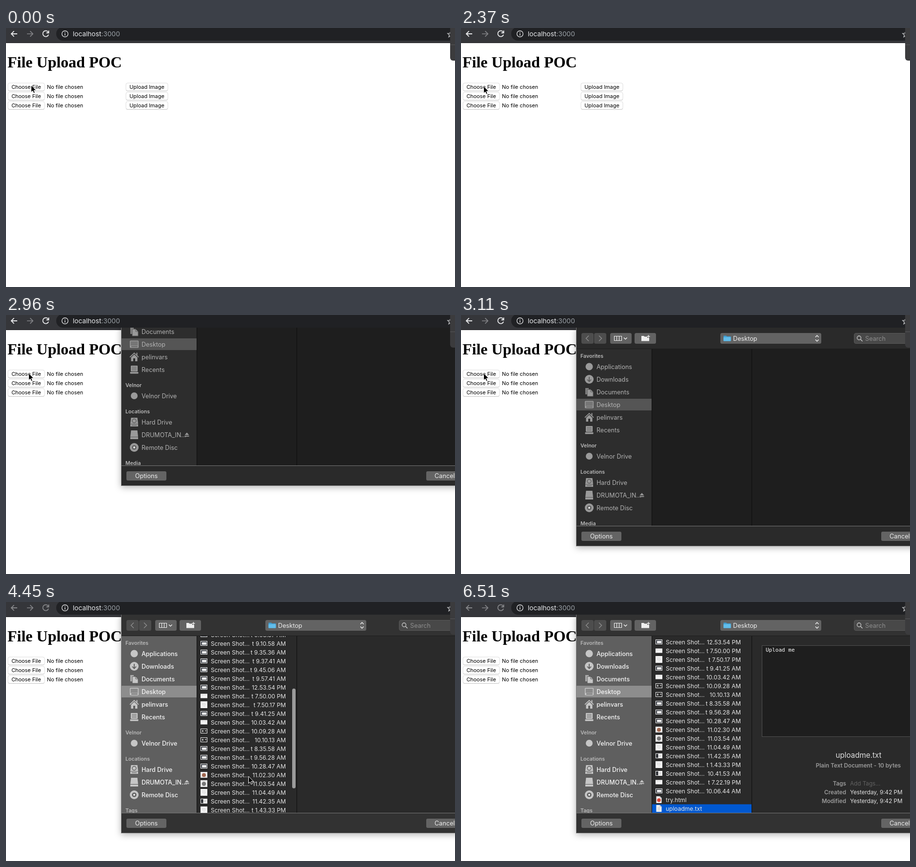
An HTML page for the animation above (8 s loop, 921 by 532 pixels).

```html
<!DOCTYPE html>
<html lang="en">
<head>
<meta charset="utf-8">
<title>File Upload POC</title>
<style>
html, body { margin: 0; width: 100%; height: 100%; overflow: hidden; background: #fff; }
svg { display: block; width: 921px; height: 532px; font-family: Inter, "Open Sans", sans-serif; }
text { white-space: pre; }
.h1 { font: bold 32px "Liberation Serif", serif; }
.form { font-size: 10.9px; }
.url { font-size: 13.7px; }
.head { font-size: 10.6px; font-weight: 600; fill: #b9b9b9; }
.item { font-size: 12.5px; font-weight: 500; fill: #f4f4f4; }
.ui { font-size: 12.7px; fill: #ededed; }
.row { font-size: 12px; fill: #e6e6e6; }
.info { font-size: 11.7px; }
.label { font-weight: 600; fill: #9b9b9b; }
.mono { font: 11px "DejaVu Sans Mono", monospace; fill: #fff; }
.icons { fill: #c6c6c6; stroke: none; }
.side { fill: #5f5f5f; }
.chosen { fill: #8d8d8d; }
.chrome { fill: #323232; }
.list { fill: #2a2a2a; }
.dim .side { fill: #2d2d2d; }
.dim .chosen { fill: #555; }
.dim .chrome { fill: #2a2a2a; }
.dim .list { fill: #1e1e1e; }
.dim .item { fill: #b2b2b2; font-weight: 400; }
.dim .icons { fill: #9a9a9a; }
</style>
</head>
<body>
<svg id="stage" viewBox="0 0 921 532"></svg>
<script>
const LOOP = 8000;
const stage = document.getElementById('stage');

const rect = (x, y, w, h, fill, extra = '') =>
  `<rect x="${x}" y="${y}" width="${w}" height="${h}" fill="${fill}" ${extra}/>`;
const circle = (x, y, r, fill, extra = '') =>
  `<circle cx="${x}" cy="${y}" r="${r}" fill="${fill}" ${extra}/>`;
const path = (d, extra = '') => `<path d="${d}" ${extra}/>`;
const line = (d, color, width = 1) =>
  path(d, `fill="none" stroke="${color}" stroke-width="${width}"`);
const text = (x, y, cls, value, extra = '') =>
  `<text x="${x}" y="${y}" class="${cls}" ${extra}>${value}</text>`;
const group = (id, body, extra = '') => `<g id="${id}" ${extra}>${body}</g>`;
const END = 'text-anchor="end"', MIDDLE = 'text-anchor="middle"';

// Browser window
function toolbar() {
  return rect(0, 0, 921, 31, '#35363a') + rect(0, 30, 921, 1, '#29282b') +
    rect(103, -2, 860, 28, '#202124', 'rx="14"') +
    group('nav', path('M23 12H11M16.5 6.3L10.8 12L16.5 17.7') +
      path('M86.6 8.4A6 6 0 1 0 87.2 13.6M87.6 5.2V10H82.8'), 'fill="none" stroke-width="1.8"') +
    line('M43 12H55M49.5 6.3L55.2 12L49.5 17.7', '#828387', 1.7) +
    circle(121, 12, 6.3, 'none', 'stroke="#d5d6d8" stroke-width="1.4"') +
    line('M121 11V15.5M121 8.3V9.8', '#d5d6d8', 1.5) +
    text(137, 17, 'url', 'localhost<tspan fill="#9aa0a6">:3000</tspan>', 'fill="#e8eaed"') +
    line('M912 7L910.5 10.8L905.8 11.2L909.4 14.2L908.2 18.5L912 16', '#c6c7c9', 1.3);
}

function button(id, x, y, w, label) {
  return rect(x, y + .8, w, 16, '#bdbdbd', 'rx="3.5"') +
    rect(x, y, w, 16, '#fff', `id="${id}" rx="3.5" stroke="#d5d5d5" stroke-width=".8"`) +
    text(x + w / 2, y + 12, 'form', label, MIDDLE);
}

function page() {
  let out = text(3, 81, 'h1', 'File Upload POC');
  for (let i = 0; i < 3; i++) {
    const y = 113 + 19 * i;
    out += button('choose' + i, 4, y, 75, 'Choose File') +
      text(84, y + 12, 'form', 'No file chosen') +
      button('upload' + i, 246, y, 86, 'Upload Image');
  }
  return out;
}

// Sidebar icons, centred on 0,0
const DARK = '#5a5a5a';
const icons = {
  apps: circle(0, 0, 7.5, 'inherit'),
  down: circle(0, 0, 9, 'inherit') + line('M0 -5V4M-4 .5L0 4.8L4 .5', DARK, 1.8),
  docs: path('M-8 -8H-1V5H-8Z', 'opacity=".75"') +
    path('M-4 -5H3L8 0V9H-4Z', `stroke="${DARK}"`) + line('M3 -5V0H8', DARK),
  desk: rect(-9, -7.5, 18, 15, 'inherit', 'rx="1.5"') +
    rect(-7.5, -6, 15, 9, DARK, 'opacity=".55"') + line('M-6 5H7', DARK, 1.6),
  home: path('M0 -9L9.5 0L8.3 1.3L0 -6.7L-8.3 1.3L-9.5 0ZM4.5 -8.5H6.5V-3L4.5 -5ZM0 -5L6.5 1.2V9H2V3H-2V9H-6.5V1.2Z'),
  recent: rect(-7, -8, 14, 12, 'inherit', 'rx="1"') + rect(-8.5, 5, 17, 3.5, 'inherit', 'rx="1"') +
    line('M-5 -5H5M-5 -2H5M-5 1H5', DARK, 1.2),
  sync: circle(0, 0, 7, 'inherit'),
  disk: path('M-6.5 -9H6.5L8 3V9H-8V3Z') + line('M-8 4H8M-5 6.7H5', DARK) +
    circle(0, -2.5, 4, 'none', `stroke="${DARK}" stroke-width="1.4"`),
  drive: path('M-6.5 -9H6.5L8 4V9H-8V4Z') + line('M-8 4.5H8', DARK),
  disc: circle(0, 0, 9, 'inherit') + circle(0, 0, 4.6, DARK) + circle(0, 0, 2.2, '#ddd'),
};

const places = [
  ['Applications', 106, 'apps'], ['Downloads', 132, 'down'], ['Documents', 158, 'docs'],
  ['Desktop', 184, 'desk'], ['pelinvars', 210, 'home'], ['Recents', 236, 'recent'],
  ['Velnor Drive', 290, 'sync'], ['Hard Drive', 344, 'disk'],
  ['DRUMOTA_IN...', 370, 'drive'], ['Remote Disc', 396, 'disc'],
];

function sidebar() {
  return rect(236, 69, 155, 364, '', 'class="side"').replace('fill=""', '') +
    rect(236, 172, 155, 24, '', 'class="chosen"').replace('fill=""', '') +
    [['Favorites', 84], ['Velnor', 268], ['Locations', 322]]
      .map(([name, y]) => text(245, y + 4, 'head', name)).join('') +
    text(245, 432, 'head', 'Tags', 'id="last"') +
    places.map(([name, y, icon]) =>
      `<g class="icons" transform="translate(263 ${y})">${icons[icon]}</g>` +
      text(278, y + 4.6, 'item', name)).join('') +
    path('M366.5 370.5L371 365.5L375.5 370.5ZM366.5 372H375.5V373.7H366.5Z', 'class="icons"');
}

// File list
const times = ('8.36.20P 2.44.39P 2.45.27P 4.25.19P 8.15.00A 8.50.15A 9.05.44A 9.08.37A ' +
  '9.10.58A 9.35.36A 9.37.41A 9.45.06A 9.57.41A 12.53.54P 7.50.00P 7.50.17P 9.41.25A ' +
  '10.03.42A 10.09.28A 10.10.13A 8.35.58A 9.56.28A 10.28.47A 11.02.30A 11.03.54A ' +
  '11.04.49A 11.42.35A 1.43.33P 10.41.53A 7.22.19P 10.06.44A').split(' ');
const shots = times.map(s =>
  ['Screen Shot...', (s.indexOf('.') < 2 ? 't ' : '') + s.slice(0, -1) + ' ' + s.slice(-1) + 'M']);
const files = [['asd'], ['bayon3.jpg'], ['IMG_201911...', '_095008.jpg'],
  ['IMG_201911...', '_100134.jpg'], ...shots, ['try.html'], ['uploadme.txt']];
const kinds = 'fppqw' + 's'.repeat(13) + 'wbswddssscgbhbhwsot';

const frame = rect(-7, -5, 14, 10, '#f2f2f2');
const sheet = path('M-5.5 -7H2L5.5 -3.5V7H-5.5Z', 'fill="#f1f1f1"') + line('M2 -7V-3.5H5.5', '#aaa', .8);
const thumbs = {
  f: path('M-7.5 -5H-2L-.5 -3.5H7.5V6H-7.5Z', 'fill="#3f9fd4"') + rect(-7.5, -2, 15, 8, '#62bdea', 'rx="1"'),
  p: frame + rect(-6, -4, 12, 8, '#6f8fb8') + path('M-6 4V1L-2 -2L1 1L4 -1L6 4Z', 'fill="#353c48"'),
  q: rect(-5.5, -7, 11, 14, '#eee') + rect(-4.5, -6, 9, 12, '#7890b4') + path('M-4.5 6V0L0 -4L4.5 6Z', 'fill="#343944"'),
  w: rect(-7, -4.5, 14, 9, '#f5f5f5') + line('M-5 -1.5H5', '#d5d5d5', .8),
  s: frame + rect(-6, -4, 12, 8, '#34383f') + rect(-4, -2.2, 9, 5, '#f0f0f0'),
  b: rect(-7, -7, 14, 14, '#f4f4f4') + line('M-4 -3H3M-4 0H4M-1 3H2', '#c5c5c5', .8),
  d: frame + rect(-6, -4, 12, 8, '#262626') + rect(-4, -2, 3, 4, '#aaa') + rect(2, -2, 3, 3, '#888'),
  c: rect(-7, -6, 14, 12, '#eee') + circle(0, .5, 4, '#a0674f'),
  g: rect(-7, -7, 14, 14, '#e9e9e9') + circle(0, .5, 4.2, '#777'),
  h: frame + rect(-6, -4, 4.5, 8, '#292b30') + line('M0 -1H5M0 1.5H4', '#aaa', .8),
  o: sheet + circle(0, 1, 3.8, '#db4437'),
  t: sheet + line('M-3 -2H3M-3 .5H3M-3 3H3', '#b5b5b5', .8),
};

function fileList() {
  return rect(392, 717.5, 204, 18, '#0058d0', 'id="mark"') + files.map(([a, b], i) => {
    const y = 78 + 18 * i, right = a[0] === 'I' ? 577 : 574;
    return `<g transform="translate(406 ${y})">${thumbs[kinds[i]]}</g>` +
      text(420, y + 4.6, 'row', a) + (b ? text(right, y + 4.6, 'row', b, END) : '');
  }).join('') + path('M588 74.5L594.5 78L588 81.5Z', 'fill="#9a9a9a"');
}

function preview() {
  const facts = [['Tags', 'Add Tags...', '#626262'],
    ['Created', 'Yesterday, 9:42 PM', '#e4e4e4'], ['Modified', 'Yesterday, 9:42 PM', '#e4e4e4']];
  return group('paper', rect(617.5, 89.5, 320, 187, '#1e1e1e', 'stroke="#505050"') +
      text(625, 102, 'mono', 'Upload me')) +
    group('facts', text(815.5, 319.5, '', 'uploadme.txt', MIDDLE + ' font-size="15.2" fill="#dedede"') +
      text(815, 340, 'info label', 'Plain Text Document - 10 bytes', MIDDLE) +
      facts.map(([k, v, color], i) => text(790, 377 + 18 * i, 'info label', k, END) +
        text(798, 377 + 18 * i, 'info', v, `fill="${color}"`)).join(''));
}

function dialogBar() {
  const box = (x, w, fill) => rect(x, 37, w, 22, fill, 'rx="3.5"');
  return box(247, 25, '#4d4d4d') + box(273, 25, '#4d4d4d') + box(306, 44, '#626262') +
    box(356, 44, '#626262') + box(532, 207, '#636363') +
    rect(806.5, 37.5, 130, 21, '#484848', 'rx="3.5" stroke="#5a5a5a"') +
    line('M262 42.5L256.5 48L262 53.5M283 42.5L288.5 48L283 53.5', '#8b8b8b', 1.5) +
    line('M314.5 43.5H329.5V52.5H314.5ZM319.5 43.5V52.5M324.5 43.5V52.5', '#eee', 1.2) +
    line('M334 46.5L337.3 49.8L340.6 46.5', '#eee', 1.5) +
    path('M370 43H375L376.5 44.5H382V47H386V53.5H370Z', 'fill="#eee"') +
    line('M384.5 41V47M381.5 44H387.5', '#eee', 1.3) +
    `<g transform="translate(546 47.5)">${thumbs.f}</g>` + text(558, 52.8, 'ui', 'Desktop') +
    line('M727 45.5L730.3 42L733.6 45.5M727 50.5L730.3 54L733.6 50.5', '#eee', 1.5) +
    circle(816.5, 47, 4, 'none', 'stroke="#ccc" stroke-width="1.3"') +
    line('M819.5 50L823.5 54', '#ccc', 1.4) + text(829, 52.8, 'ui', 'Search', 'style="fill:#8d8d8d"');
}

function dialog() {
  return path('M236 26H940V475H236Z', 'class="chrome" filter="url(#shadow)"') + dialogBar() +
    path('M392 69H940V433H392Z', 'class="list"') +
    `<g clip-path="url(#body)">` + sidebar() +
    `<g clip-path="url(#column)">${group('files', fileList())}</g>` +
    rect(587, 0, 7, 205, '#9b9b9b', 'id="thumb" rx="3.5"') + preview() + '</g>' +
    line('M391.5 69V433M596.5 69V433', '#0d0d0d') + line('M236 69.5H921', '#1d1d1d') +
    line('M236 433.5H921', '#777') + line('M236.5 26V474.5H921', '#777') +
    rect(247, 445, 82, 19, '#646464', 'rx="3"') + text(288, 459.3, 'ui', 'Options', MIDDLE) +
    rect(862, 445, 82, 19, '#646464', 'rx="3"') + text(879, 459.3, 'ui', 'Cancel');
}

stage.innerHTML = `<defs>
  <filter id="shadow" x="-10%" y="-10%" width="120%" height="120%">
    <feDropShadow dx="0" dy="3" stdDeviation="7" flood-opacity=".3"/></filter>
  <clipPath id="sheet"><rect x="0" y="26" width="921" height="506"/></clipPath>
  <clipPath id="body"><rect x="236" y="69" width="685" height="364"/></clipPath>
  <clipPath id="column"><rect x="392" y="70" width="204" height="363"/></clipPath></defs>` +
  rect(0, 0, 921, 532, '#fff') + page() + toolbar() +
  `<g clip-path="url(#sheet)">${group('dialog', dialog())}</g>` +
  rect(911, -10, 30, 77, '#3b3b3d', 'rx="6"') + rect(911, 34, 10, 1, '#565658') +
  group('cursor', path('M0 0V14.6L3.3 11.5L5.4 16.4L7.9 15.3L5.8 10.5H10.3Z',
    'fill="#000" stroke="#fff" stroke-width="1" stroke-linejoin="round"'));

// Keyed steps: [time, value...], each held until the next
const pointer = [[0, 51.5, 117.5], [600, 70, 124], [740], [1190, 152, 149], [1490, 122, 141],
  [1640, 86, 131], [1780, 58, 123], [1930, 46.5, 119.5], [3260, 180, 170], [3410, 420, 265],
  [3560, 507, 293.5], [4010, 502, 330], [4160, 497.5, 358], [5040, 482, 402],
  [5190, 465.5, 427], [5340, 456.5, 426], [5630], [6070, 456.5, 425.5], [6220]];
const slide = [[0], [2810, -330], [2960, -124], [3110, 0]];
const scroll = [[0, 0], [4450, 209], [4600, 266], [4740, 294], [4890, 302]];

const hold = (steps, t) => steps.filter(s => s[0] <= t).pop().slice(1);
const $ = id => document.getElementById(id);
const show = (id, on) => $(id).setAttribute('visibility', on ? 'inherit' : 'hidden');
const move = (id, x, y) => $(id).setAttribute('transform', `translate(${x} ${y})`);

function draw(t) {
  const [x, y] = hold(pointer, t);
  show('cursor', x !== undefined);
  if (x !== undefined) move('cursor', x, y);

  const [drop] = hold(slide, t);
  $('dialog').setAttribute('visibility', drop === undefined ? 'hidden' : 'visible');
  move('dialog', 0, drop || 0);
  const loaded = t >= 3260;
  $('dialog').setAttribute('class', loaded ? '' : 'dim');
  $('last').textContent = loaded ? 'Tags' : 'Media';

  const [top] = hold(scroll, t);
  show('files', loaded);
  move('files', 0, -top);
  $('thumb').setAttribute('y', 70 + top * .516);
  show('thumb', t >= 4450 && t < 5480);
  show('mark', t >= 6070);
  show('paper', t >= 6360);
  show('facts', t >= 6220);

  $('nav').setAttribute('stroke', t < 3710 ? '#e8e9eb' : '#858689');
  $('choose0').setAttribute('fill', t >= 2230 && t < 2370 ? '#e2e2e2' : '#fff');
}

const start = performance.now();
function tick() {
  draw((performance.now() - start) % LOOP);
  requestAnimationFrame(tick);
}
tick();
</script>
</body>
</html>
```
